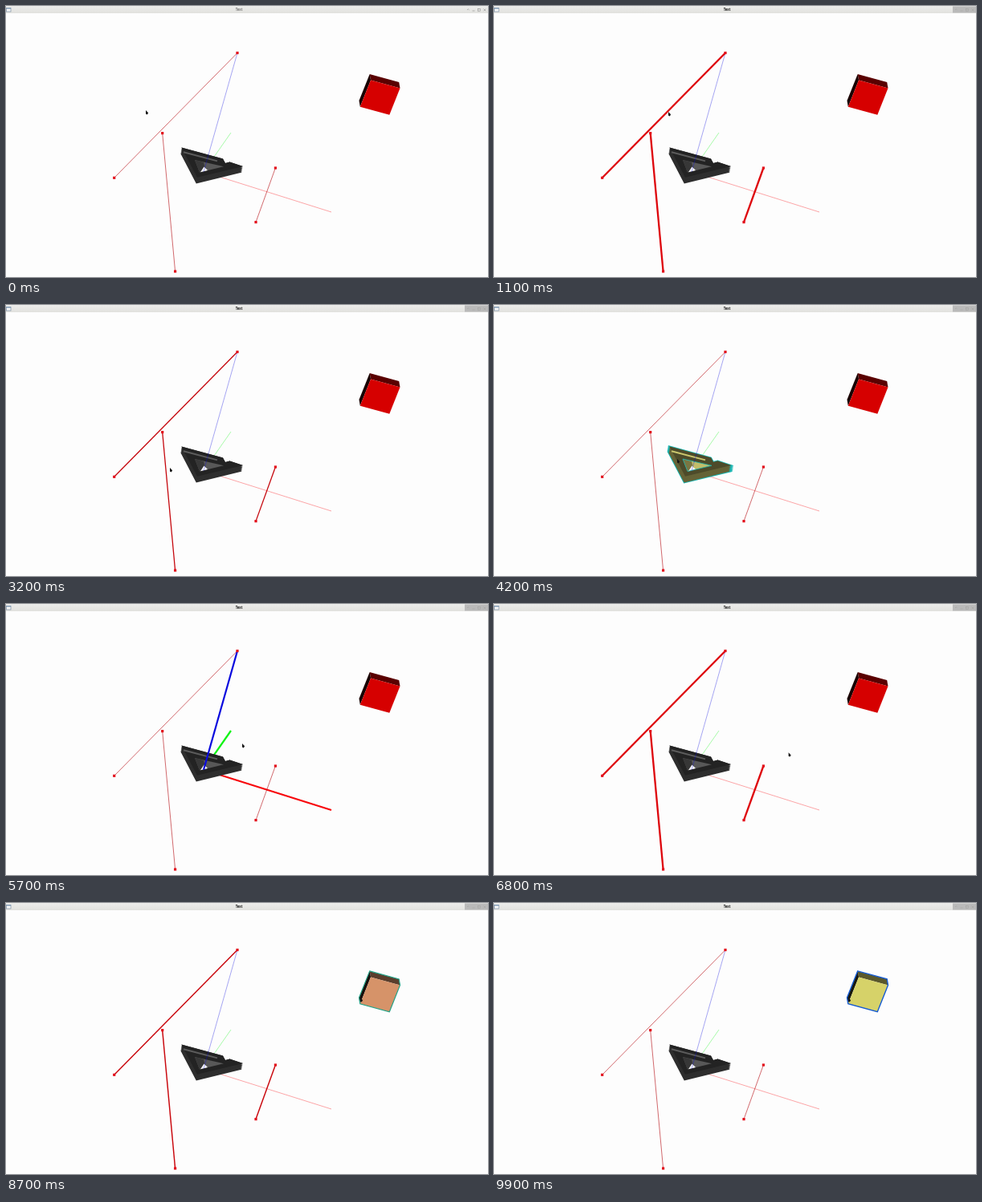
Recreate the animation shown at these times as an HTML page with a canvas. Size 600 by 338 pixels, loop 10000 ms.

```html
<!DOCTYPE html>
<html lang="en">
<head>
<meta charset="utf-8">
<title>Test</title>
<style>
html, body { margin: 0; width: 100%; height: 100%; overflow: hidden; background: #fdfdfd; }
canvas { display: block; width: 600px; height: 338px; }
</style>
</head>
<body>
<canvas id="stage" width="600" height="338"></canvas>
<script>
const ctx = document.getElementById('stage').getContext('2d');
const LOOP = 10000, STEP = 100;

const mix = (a, b, k) => a + (b - a) * k;
const blend = (a, b, k) => a.map((v, i) => mix(v, b[i], k));
const add = (...vectors) => vectors.reduce((a, b) => [a[0] + b[0], a[1] + b[1]]);
const rgb = c => `rgb(${c.map(Math.round).join(',')})`;

// Linear rise from 0 to 1 over the given span.
const ramp = (t, from, span) => Math.min(1, Math.max(0, (t - from) / span));
// Rises at one time, falls at another.
const pulse = (t, rise, fall, fadeIn, fadeOut) =>
  ramp(t, rise, fadeIn) - ramp(t, fall, fadeOut);

function trace(points, closed) {
  ctx.beginPath();
  for (const [x, y] of points) ctx.lineTo(x, y);
  if (closed) ctx.closePath();
}

function fill(points, color) {
  trace(points, true);
  ctx.fillStyle = color;
  ctx.fill();
}

function stroke(points, color, width, closed) {
  trace(points, closed);
  ctx.strokeStyle = color;
  ctx.lineWidth = width;
  ctx.stroke();
}

// Pointer stops: time and position.
const stops = [
  [0, [174, 130]], [1100, [217, 132]], [2100, [189, 172]], [3200, [204, 203]],
  [4200, [228, 192]], [5700, [294, 174]], [6200, [321, 226]], [7700, [435, 124]],
  [8600, [441, 118]], [LOOP, [441, 118]]
];

function pointerAt(t) {
  const i = stops.findIndex(stop => stop[0] > t);
  const [from, a] = stops[i - 1], [to, b] = stops[i];
  return blend(a, b, (t - from) / (to - from));
}

function drawPointer(t) {
  const [x, y] = pointerAt(t);
  fill([[x, y], [x, y + 4.5], [x + 1.8, y + 5.4], [x + 3.1, y + 3.2]], '#151515');
}

const segments = [
  [[288, 58.5], [134.7, 214.3]],
  [[194.7, 158.6], [210.6, 331]],
  [[335.4, 202], [311, 269.6]]
];

function drawSegments(t) {
  const level = pulse(t, 500, 1300, 400, 600) + pulse(t, 2300, 2900, 400, 500)
    + pulse(t, 6000, 7900, 700, 1600);
  const color = rgb([mix(180, 222, level), 6, 12]);
  for (const ends of segments) {
    stroke(ends, color, mix(0.6, 2.3, level));
    ctx.fillStyle = '#e3101c';
    for (const [x, y] of ends) ctx.fillRect(x - 1.6, y - 1.6, 3.2, 3.2);
  }
}

const origin = [246, 206.8];

function drawAxis(end, color, level) {
  ctx.globalAlpha = mix(0.4, 1, level);
  stroke([origin, end], color, mix(0.9, 2.2, level));
  ctx.globalAlpha = 1;
}

// The bracket is a flat plate pushed down along one vector.
const plate = [[218.5, 176.5], [270, 190.5], [273, 196], [278.5, 194.5], [295, 200], [238, 213.8]];
const plateDepth = [-1.2, 7.6];
const hole = [[235, 192], [271, 200.3], [241, 207.5]];

function extrude(paint) {
  for (let k = 1; k >= 0; k -= 0.125) {
    paint(plate.map(([x, y]) => [x + plateDepth[0] * k, y + plateDepth[1] * k]));
  }
}

function drawBracket(level) {
  const tone = gray => rgb(blend([gray, gray, gray], [gray * 2.2, gray * 2.15, gray * 1.2], level));
  if (level > 0) {
    ctx.globalAlpha = level;
    extrude(points => stroke(points, '#18b5b2', 2, true));
    ctx.globalAlpha = 1;
  }
  extrude(points => fill(points, tone(46)));
  fill(plate, tone(35));
  stroke([[221, 182.3], [263, 193.4]], tone(92), 2);
  fill(hole, tone(88));
  fill([hole[0], [246, 195], [248, 203], hole[2]], tone(55));
  fill([[246.5, 200.5], [251, 205], [242, 207.2]], '#fafafa');
  if (level > 0) {
    ctx.globalAlpha = level;
    stroke(hole, '#18b5b2', 0.8, true);
    ctx.globalAlpha = 1;
  }
}

// Cube: front corner, its two edges, and the way back.
const corner = [454, 92.5], across = [36.5, 10], down = [-13.2, 33.2], back = [-1.3, -7.6];

function drawCube(t) {
  const tint = ramp(t, 7200, 500), shift = ramp(t, 8300, 1000);
  const shade = red => rgb([red, red * 0.49 * (tint + shift), red * 0.49 * tint]);
  const right = add(corner, across), bottom = add(corner, down);
  const far = add(right, down);
  const backLeft = add(corner, back), backRight = add(right, back), backBottom = add(bottom, back);
  fill([corner, right, backRight, backLeft], shade(90));
  fill([corner, bottom, backBottom, backLeft], shade(24));
  fill([corner, right, far, bottom], shade(214));
  if (tint > 0) {
    ctx.globalAlpha = tint;
    const color = rgb(blend([45, 210, 85], [20, 90, 210], shift));
    stroke([backLeft, backRight, right, far, bottom, backBottom], color, 1 + shift * 0.4, true);
    ctx.globalAlpha = 1;
  }
}

function drawTitleBar(active) {
  const shade = ctx.createLinearGradient(0, 0, 0, 9);
  shade.addColorStop(0, '#ededeb');
  shade.addColorStop(1, '#e1e1de');
  ctx.fillStyle = shade;
  ctx.fillRect(0, 0, 600, 9);

  ctx.fillStyle = '#f8f8f8';
  ctx.fillRect(0.5, 2.5, 5.5, 4.5);
  ctx.strokeStyle = '#7d91a5';
  ctx.lineWidth = 0.7;
  ctx.strokeRect(0.5, 2.5, 5.5, 4.5);
  stroke([[0.5, 3], [6, 3]], '#6f8eae', 1);

  ctx.font = 'bold 4.3px "Open Sans", sans-serif';
  ctx.textAlign = 'center';
  ctx.textBaseline = 'middle';
  ctx.fillStyle = active ? '#161616' : '#777';
  ctx.fillText('Test', 290, 4.8);

  if (active) {
    ctx.fillStyle = '#bababa';
    ctx.fillRect(571, 0.5, 29, 8);
  }
  const ink = active ? '#a4a4a2' : '#8b8b8b';
  stroke([[574, 5], [575.3, 3.8], [576.6, 5]], ink, 0.6);
  stroke([[580.5, 6], [583.5, 6]], ink, 0.6);
  ctx.strokeRect(587.5, 3.5, 2.7, 2.7);
  stroke([[594.5, 3.5], [597.3, 6.3]], ink, 0.6);
  stroke([[597.3, 3.5], [594.5, 6.3]], ink, 0.6);
}

function draw(t) {
  ctx.fillStyle = '#fdfdfd';
  ctx.fillRect(0, 0, 600, 338);
  const axes = pulse(t, 4800, 5900, 400, 900);
  drawAxis([405, 257], '#f8080c', axes);
  drawAxis([280, 158], '#0cf412', axes);
  drawBracket(pulse(t, 3500, 4500, 400, 400));
  drawAxis([288, 58.5], '#0808de', axes);
  drawSegments(t);
  drawCube(t);
  drawTitleBar(t >= STEP);
  drawPointer(t);
}

const start = performance.now();
function tick() {
  const elapsed = (performance.now() - start) % LOOP;
  draw(Math.floor(elapsed / STEP) * STEP);
  requestAnimationFrame(tick);
}
tick();
</script>
</body>
</html>
```
